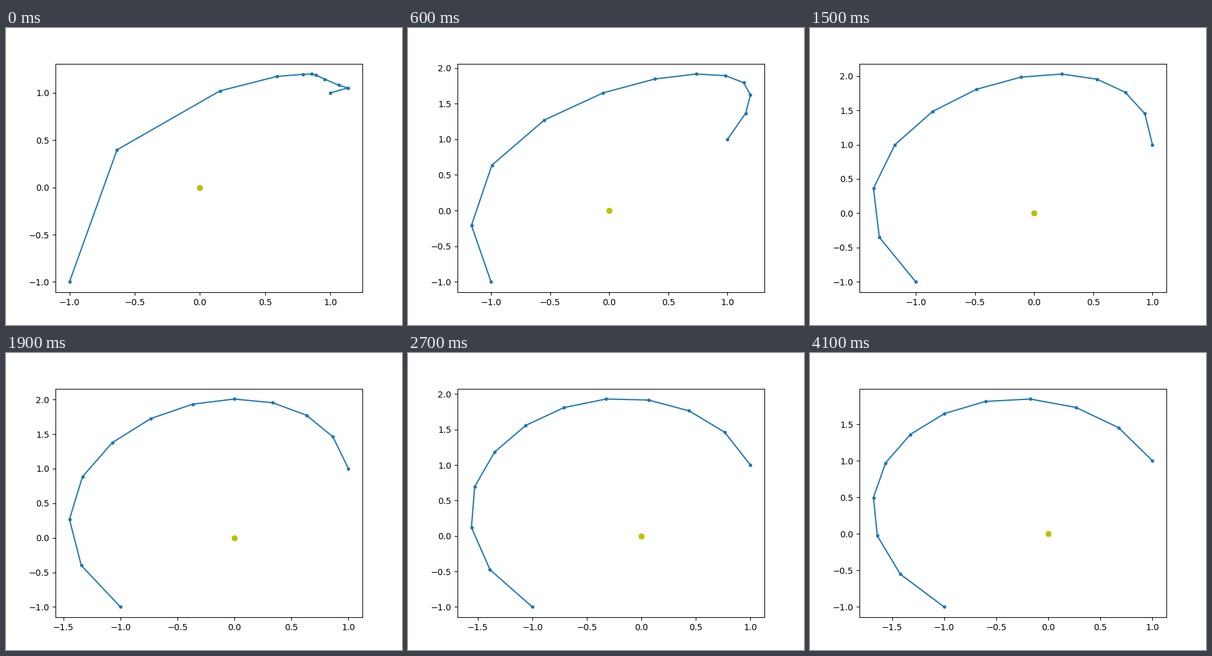
Recreate the animation shown at these times as a matplotlib script. Size 640 by 480 pixels, loop 4200 ms.

```python
import numpy as np
import matplotlib.pyplot as plt
from matplotlib.animation import FuncAnimation

FRAMES, INTERVAL = 42, 100
PULL = 0.5                  # central force times time step squared
SUBSTEPS, RATE = 20, 0.1    # relaxation steps per frame and their size

# First guess of the path; both end points stay fixed
GUESS_X = [-1, -.635, .155, .592, .791, .858, .891, .959, 1.066, 1.14, 1.132, 1]
GUESS_Y = [-1, .398, 1.022, 1.175, 1.197, 1.2, 1.189, 1.145, 1.082, 1.05, 1.052, 1]


def relax(path):
    """Descend the action of an orbit around the origin for one frame."""
    path = path.copy()
    for _ in range(SUBSTEPS):
        inner = path[1:-1]
        bend = path[2:] - 2 * inner + path[:-2]
        radius = np.linalg.norm(inner, axis=1, keepdims=True)
        path[1:-1] = inner + RATE * (bend + PULL * inner / radius**3)
    return path


paths = [np.column_stack([GUESS_X, GUESS_Y])]
while len(paths) < FRAMES:
    paths.append(relax(paths[-1]))

fig, ax = plt.subplots(figsize=(6.4, 4.8), dpi=100)
line, = ax.plot(GUESS_X, GUESS_Y, ".-")
ax.plot([0], [0], "yo")


def draw(frame):
    line.set_data(*paths[frame].T)
    ax.relim()
    ax.autoscale_view()
    return line,


anim = FuncAnimation(fig, draw, frames=FRAMES, interval=INTERVAL,
                     repeat=True, repeat_delay=0, blit=False)
plt.show()
```
